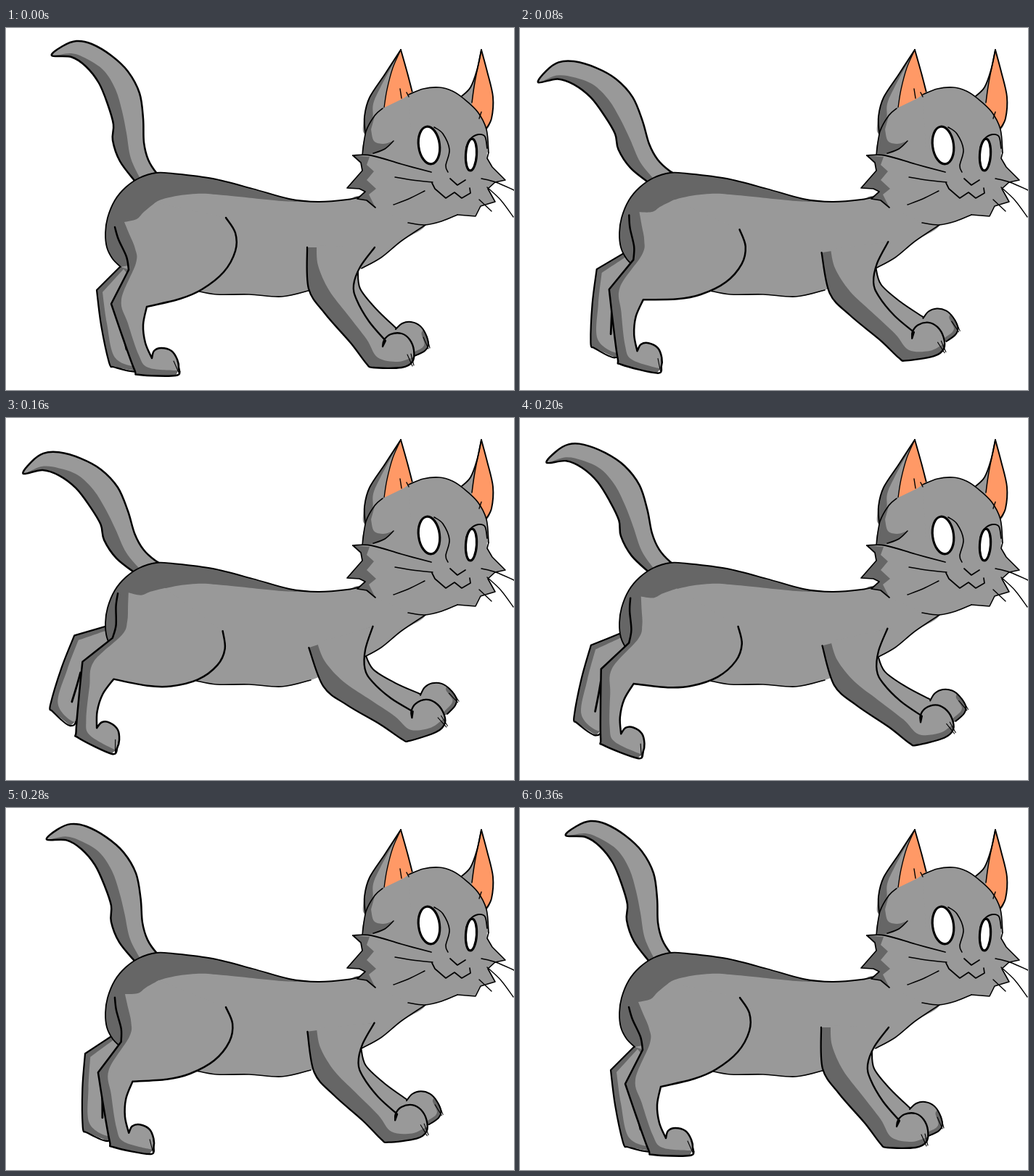
An HTML page with a canvas for the animation above (400 ms loop, 700 px wide and 500 px high).

```html
<!DOCTYPE html>
<html lang="en">
<head>
<meta charset="utf-8">
<title>Running cat</title>
<style>
  html, body { margin: 0; width: 100%; height: 100%; overflow: hidden; background: #fff; }
  canvas { display: block; }
</style>
</head>
<body>
<canvas id="stage" width="700" height="500"></canvas>
<script>
const ctx = document.getElementById('stage').getContext('2d');
const LIGHT = '#999', DARK = '#666', EAR = '#ff9966', INK = '#000';
const STEP = 40, LAST = 9, REACH_END = 4, DROP_END = 3;

// Each limb is one rigid shape turning about its joint; `swing` is its widest turn in degrees.
// Outlines are a few x, y points; a repeated point marks a corner.
const tail = {
  joint: [192, 207], swing: -21.5, width: 2.5,
  back: [178,212, 157,184, 147,155, 148,133, 140,105, 128,76, 110,53, 90,40, 63,38],
  front: [63,38, 78,25, 97,18, 118,22, 145,38, 168,60, 184,90, 189,125, 190,158, 196,182, 208,201, 222,214],
  edge: [186,210, 172,180, 166,145, 160,115, 151,85, 135,59, 112,43, 90,35, 63,38]
};
const hind = {
  joint: [227, 268], swing: 24.6, width: 2.5,
  back: [150,275, 155,292, 166,316, 169,334, 169,334, 145,381, 145,381, 160,425, 177,472, 184,479, 234,480],
  front: [234,480, 238,470, 236,458, 228,446, 214,442, 204,446, 201,456, 201,456,
    192,435, 189,410, 194,385, 194,385, 240,374, 270,361, 300,337, 316,308, 316,283, 303,262],
  edge: [206,241, 190,254, 180,264, 163,268, 163,268, 170,285, 178,305, 179,325,
    159,375, 168,408, 183,452, 196,469, 234,473]
};
const farHind = {
  joint: [230, 271], swing: 28.7, width: 2.2,
  back: [175,312, 158,329, 125,362, 125,362, 131,410, 142,462, 147,468, 147,468, 180,474],
  front: [180,474, 183,450, 172,345],
  edge: [162,333, 133,365, 133,365, 139,408, 150,455, 180,467]
};
const fore = {
  joint: [460, 303], swing: -18.5, width: 2.3,
  back: [415,303, 417,360, 440,395, 475,435, 497,464, 506,469, 545,469],
  front: [545,469, 560,461, 562,445, 556,430, 545,422, 530,423, 521,431, 519,440, 519,440,
    523,432, 523,432, 500,405, 483,375, 479,355, 488,330, 508,303],
  edge: [428,300, 430,328, 445,362, 470,395, 497,430, 512,455, 540,461, 561,455]
};
const farFore = {
  joint: [460, 303], swing: -20,
  shin: [485,335, 488,360, 510,388, 537,414],
  paw: [537,416, 546,408, 558,406, 570,411, 578,422, 582,437, 577,446, 563,453],
  hidden: [540,450, 505,425, 470,370, 470,340]
};

const back = [158,330, 147,319, 139,303, 137,283, 140,262, 150,238, 165,220, 184,207, 207,200,
  230,201, 285,208, 340,222, 390,236, 430,240, 470,237, 492,232];
const belly = [262,363, 290,368, 335,368, 380,371, 420,362];
const chest = [490,332, 517,317, 545,294, 578,272];

function reversed(pts) {
  return pts.map((_, i) => pts[pts.length - 2 - i + 2 * (i % 2)]);
}

// Smooth Catmull-Rom path through flat x, y pairs.
function spline(pts) {
  const path = new Path2D();
  const last = pts.length / 2 - 1;
  const at = i => {
    const k = 2 * Math.max(0, Math.min(last, i));
    return [pts[k], pts[k + 1]];
  };
  path.moveTo(pts[0], pts[1]);
  for (let i = 0; i < last; i++) {
    const [p, a, b, n] = [at(i - 1), at(i), at(i + 1), at(i + 2)];
    if (a[0] === b[0] && a[1] === b[1]) continue;
    path.bezierCurveTo(
      a[0] + (b[0] - p[0]) / 6, a[1] + (b[1] - p[1]) / 6,
      b[0] - (n[0] - a[0]) / 6, b[1] - (n[1] - a[1]) / 6, b[0], b[1]);
  }
  return path;
}

function polyline(pts) {
  const path = new Path2D();
  for (let i = 0; i < pts.length; i += 2) path.lineTo(pts[i], pts[i + 1]);
  return path;
}

function fill(pts, color, shape = spline) {
  ctx.fillStyle = color;
  ctx.fill(shape(pts));
}

function ink(pts, width = 1.6, shape = spline, color = INK) {
  ctx.strokeStyle = color;
  ctx.lineWidth = width;
  ctx.stroke(shape(pts));
}

function claws(x, y) {
  ink([x - 7, y - 10, x, y + 6], 1.1);
  ink([x - 2, y - 11, x + 2, y + 5], 1.1);
}

function swing(limb, amount, paint) {
  const [x, y] = limb.joint;
  ctx.save();
  ctx.translate(x, y);
  ctx.rotate(limb.swing * amount * Math.PI / 180);
  ctx.translate(-x, -y);
  paint(limb);
  ctx.restore();
}

function paintLimb({ back, front, edge, width }) {
  fill([...back, ...front], DARK);
  fill([...edge, ...front.slice(2)], LIGHT);
  ink([...back, ...front.slice(2)], width);
}

function paintNearLeg(leg) {
  paintLimb(leg);
  claws(leg.front[2], leg.front[3]);
}

function paintFarHind(leg) {
  paintLimb(leg);
  ink([157,403, 161,420, 166,444], 2.8);
}

function paintFarFore({ shin, paw, hidden }) {
  const shape = [...shin, ...paw, ...hidden];
  fill(shape, LIGHT);
  ctx.save();
  ctx.clip(spline(shape));
  ink(paw.slice(8), 11, spline, DARK);
  ctx.restore();
  ink(shin, 2);
  ink(paw, 2);
  claws(paw[10], paw[11]);
}

function drawBody() {
  fill([...back, 560,245, ...reversed(chest), ...reversed(belly)], LIGHT);
  fill([...back.slice(0, 28), 418,240, 380,239, 300,231, 262,229, 225,234, 205,242, 198,258, 185,325], DARK);
  ink(back, 1.8);
  ink(belly);
  ink(chest);
}

const leftEar = [544,30, 522,64, 501,96, 494,122, 495,146];
const leftInner = [544,30, 533,55, 525,85, 521,110];
const rightEar = [627,95, 640,82, 649,58, 655,30, 655,30, 663,60, 671,95, 669,125, 661,140];
const rightInner = [655,30, 646,75, 642,103];
const crown = [555,92, 575,84, 597,82, 615,87, 630,97, 650,116, 662,140, 665,172];
const leftFur = [478,176, 489,186, 491,197, 470,221, 487,222, 495,226, 484,236, 497,238, 509,248];
const rightFur = [663,180, 670,192, 688,210, 674,213, 664,222, 674,240, 654,246, 647,260, 622,258];
const jaw = [622,258, 600,267, 577,272, 554,269];

function eye(x, y, rx, ry, tilt) {
  ctx.beginPath();
  ctx.ellipse(x, y, rx, ry, tilt, 0, 2 * Math.PI);
  ctx.fillStyle = '#fff';
  ctx.fill();
  ctx.strokeStyle = INK;
  ctx.lineWidth = 3.2;
  ctx.stroke();
}

function drawEars() {
  fill([...leftEar, 530,125, 560,90], LIGHT);
  fill([...leftEar, 505,125, 506,105, 516,82, 544,30], DARK);
  fill([...leftInner, 560,120, 560,89, 553,62, 544,30], EAR, polyline);
  fill([...rightEar, 640,125], LIGHT);
  fill([...rightInner, 642,125, 661,140, 669,125, 671,95, 663,60], EAR, polyline);
  ink(leftEar, 1.9);
  ink([544,30, 553,62, 560,89], 1.9);
  ink(leftInner, 1.3);
  ink(rightEar, 1.9);
  ink(rightInner, 1.5);
}

function drawHead() {
  drawEars();
  fill([495,146, 508,121, 521,110, 548,97, 560,88, 628,97, 662,140, ...rightFur, ...jaw,
    509,248, ...reversed(leftFur), 491,176], LIGHT, polyline);
  fill([...crown, 665,172, 560,180, 560,180, 555,92], LIGHT);
  fill([509,118, 497,142, 491,172, 506,174, 522,168, 534,156, 534,156, 520,160, 507,156, 503,140], DARK);
  fill([...leftFur, 500,230, 510,222, 497,210, 507,198, 497,189, 501,178], DARK, polyline);
  ink([519,111, 508,121, 496,143, 491,175]);
  ink([506,173, 522,167, 534,156]);
  ink(crown);
  ink(leftFur, 1.7, polyline);
  ink([665,172, ...rightFur], 1.6, polyline);
  ink(jaw);
  for (const tuft of [[543,84, 545,97], [552,89, 555,95], [655,116, 652,125]]) ink(tuft, 1.4);
  drawFace();
}

function drawFace() {
  eye(583, 162, 14.5, 26, -0.13);
  eye(641, 175, 7.5, 22, 0.06);
  ink([590,137, 602,146, 611,168, 606,190, 609,199]);
  ink([634,165, 640,153, 651,147, 660,150, 663,166], 1.8);
  ink([612,208, 622,217, 633,210], 1.7, polyline);
  ink([587,214, 591,222, 606,235, 618,227, 628,235, 640,228, 639,221], 1.7, polyline);
  ink([478,176, 503,176, 545,188, 586,199], 1.8);
  for (const whisker of [
    [536,206, 560,210, 588,213], [534,244, 555,236, 577,225], [652,237, 669,253],
    [655,208, 675,213, 700,224], [663,220, 682,238, 699,261]
  ]) ink(whisker, 1.4);
}

// Rises evenly to 1 at `peak`, then returns to 0 with the given power.
function sway(step, peak, power) {
  return step <= peak ? step / peak : ((LAST - step) / (LAST - peak)) ** power;
}

function draw(step) {
  const reach = sway(step, REACH_END, 1);
  const drop = sway(step, DROP_END, 2);
  ctx.fillStyle = '#fff';
  ctx.fillRect(0, 0, 700, 500);
  ctx.lineCap = ctx.lineJoin = 'round';
  swing(tail, drop, paintLimb);
  swing(farHind, reach, paintFarHind);
  swing(farFore, reach, paintFarFore);
  drawBody();
  swing(hind, reach, paintNearLeg);
  swing(fore, reach, paintNearLeg);
  drawHead();
}

const start = performance.now();
function tick() {
  draw(Math.floor((performance.now() - start) / STEP) % (LAST + 1));
  requestAnimationFrame(tick);
}
tick();
</script>
</body>
</html>
```
